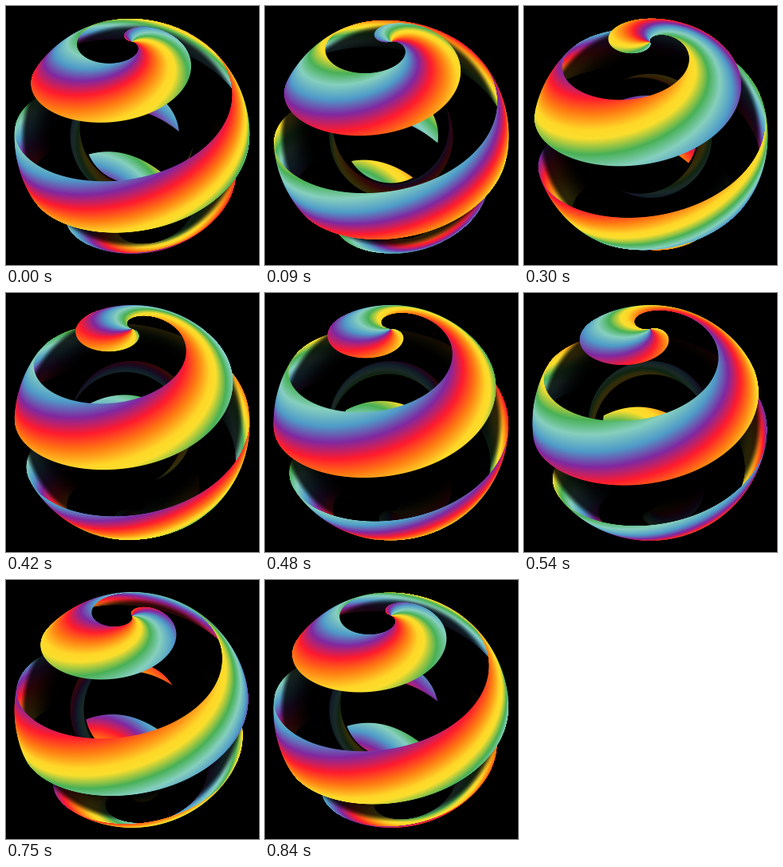
An HTML page with a canvas that plays this animation: 317x324 px, repeating every 0.87 s.

```html
<!DOCTYPE html>
<html lang="en">
<head>
<meta charset="utf-8">
<title>Spiral sphere</title>
<style>
html, body { margin: 0; width: 100%; height: 100%; overflow: hidden; background: #000; }
canvas { display: block; width: 317px; height: 324px; }
</style>
</head>
<body>
<canvas id="stage" width="317" height="324"></canvas>
<script>
const W = 317, H = 324, CX = 158, CY = 162.5, R = 147.3;
const LOOP = 870, STEP = 30, TAU = Math.PI * 2, DEG = 180 / Math.PI;
const TILT = 39.5 / DEG, CAMERA = 18, CORE = 59, RING = 78;
const ctx = document.getElementById('stage').getContext('2d');
const image = ctx.createImageData(W, H);

const clamp = x => Math.max(0, Math.min(1, x));
const smooth = (a, b, x) => { const k = clamp((x - a) / (b - a)); return k * k * (3 - 2 * k); };

const stops = [
  [0, 255, 215, 40], [0.07, 250, 222, 45], [0.2, 72, 176, 86], [0.32, 134, 207, 190], [0.46, 78, 155, 200],
  [0.59, 128, 40, 160], [0.73, 255, 26, 45], [0.86, 255, 120, 18], [1, 255, 215, 40]
];
const SHADES = 1024;
const palette = Array.from({ length: SHADES }, (_, i) => {
  const p = i / SHADES;
  const n = stops.findIndex(s => s[0] > p);
  const a = stops[n - 1], b = stops[n], k = (p - a[0]) / (b[0] - a[0]);
  return [1, 2, 3].map(c => a[c] + (b[c] - a[c]) * k);
});
const colorAt = hue => palette[Math.floor((hue - Math.floor(hue)) * SHADES) % SHADES];

// Polar angle in degrees, clockwise turn from the viewer and depth where a pixel's ray meets the sphere.
function hit(X, Y, far) {
  const L = Math.sqrt(CAMERA * CAMERA - 1);
  const A = X * X + Y * Y + L * L, B = CAMERA * L, C = CAMERA * CAMERA - 1;
  const root = Math.sqrt(Math.max(0, B * B - A * C));
  const s = (B + (far ? root : -root)) / A;
  const x = X * s, y = Y * s, z = CAMERA - L * s;
  const up = y * Math.cos(TILT) + z * Math.sin(TILT);
  const front = z * Math.cos(TILT) - y * Math.sin(TILT);
  return {
    level: Math.acos(Math.max(-1, Math.min(1, up))) * DEG,
    turn: Math.atan2(-x, front) / TAU,
    depth: Math.abs(z)
  };
}

// The core shows the spiral as slanted arcs, measured by their height on the middle axis.
const coreHit = (dx, dy) => ({
  level: (dy - 0.25 * dx - 0.0058 * dx * dx) / (1 + 0.004 * dx),
  turn: 0,
  shift: -0.0025 * dx
});

const pixels = [];
for (let y = 0; y < H; y++) {
  for (let x = 0; x < W; x++) {
    const dx = x + 0.5 - CX, dy = y + 0.5 - CY, dist = Math.hypot(dx, dy);
    if (dist > R + 0.5) continue;
    const p = { at: (y * W + x) * 4, dist, angle: Math.atan2(dy, dx) };
    p.cover = clamp(R - dist + 0.5);
    p.outer = hit(dx / R, -dy / R, false);
    p.back = hit(dx / R, -dy / R, true);
    const d = p.back.depth;
    p.glow = (1 - 0.84 * smooth(0.24, 0.4, d)) * (1 - smooth(0.42, 0.74, d));
    p.coreCover = clamp(CORE - dist + 0.5);
    if (p.coreCover) p.core = coreHit(dx, dy);
    pixels.push(p);
  }
}

const shell = { start: 10.8, pitch: 60, width: 0.53, hue: 0.53, spread: 0.52, sharp: 150 };
const core = { start: 25, pitch: 115, width: 0.5, hue: 0.2, spread: 0.45, sharp: 110 };
const rgb = [0, 0, 0];

function blend(color, light, alpha) {
  for (let c = 0; c < 3; c++) rgb[c] += (color[c] * light - rgb[c]) * alpha;
}

function paintBand(point, band, t, light, cover) {
  const half = band.width / 2;
  const q = (point.level - band.start) / band.pitch - point.turn - t - half;
  const offset = q - Math.round(q);
  const alpha = clamp((half - Math.abs(offset)) * band.sharp + 0.5) * cover;
  if (!alpha) return;
  const v = clamp((offset + half) / band.width);
  const shift = point.shift || 0;
  blend(colorAt(band.hue + shift - point.turn - 2 * t + band.spread * v), light, alpha);
}

function paintCrescent(p, t) {
  if (p.dist < CORE || p.dist > RING) return;
  const turned = p.angle + TAU * (t - 0.35);
  const fromMiddle = Math.atan2(Math.sin(turned), Math.cos(turned));
  const thick = 18 * Math.max(0, Math.cos(fromMiddle * 0.75));
  const alpha = clamp(RING - p.dist) * clamp(p.dist - RING + thick);
  blend(colorAt(p.angle / TAU - 2 * t + p.dist / 40), 0.2, alpha);
}

function draw(t) {
  const data = image.data;
  for (const p of pixels) {
    rgb.fill(0);
    paintBand(p.back, shell, t, p.glow, p.cover);
    paintCrescent(p, t);
    if (p.core) paintBand(p.core, core, t, 1, p.coreCover);
    paintBand(p.outer, shell, t, 1, p.cover);
    for (let c = 0; c < 3; c++) data[p.at + c] = rgb[c];
  }
  ctx.putImageData(image, 0, 0);
}

for (let i = 3; i < image.data.length; i += 4) image.data[i] = 255;

const begin = performance.now();
let shown = -1;
function tick() {
  const step = Math.floor(((performance.now() - begin) % LOOP) / STEP);
  if (step !== shown) {
    shown = step;
    draw(step * STEP / LOOP);
  }
  requestAnimationFrame(tick);
}
tick();
</script>
</body>
</html>
```
